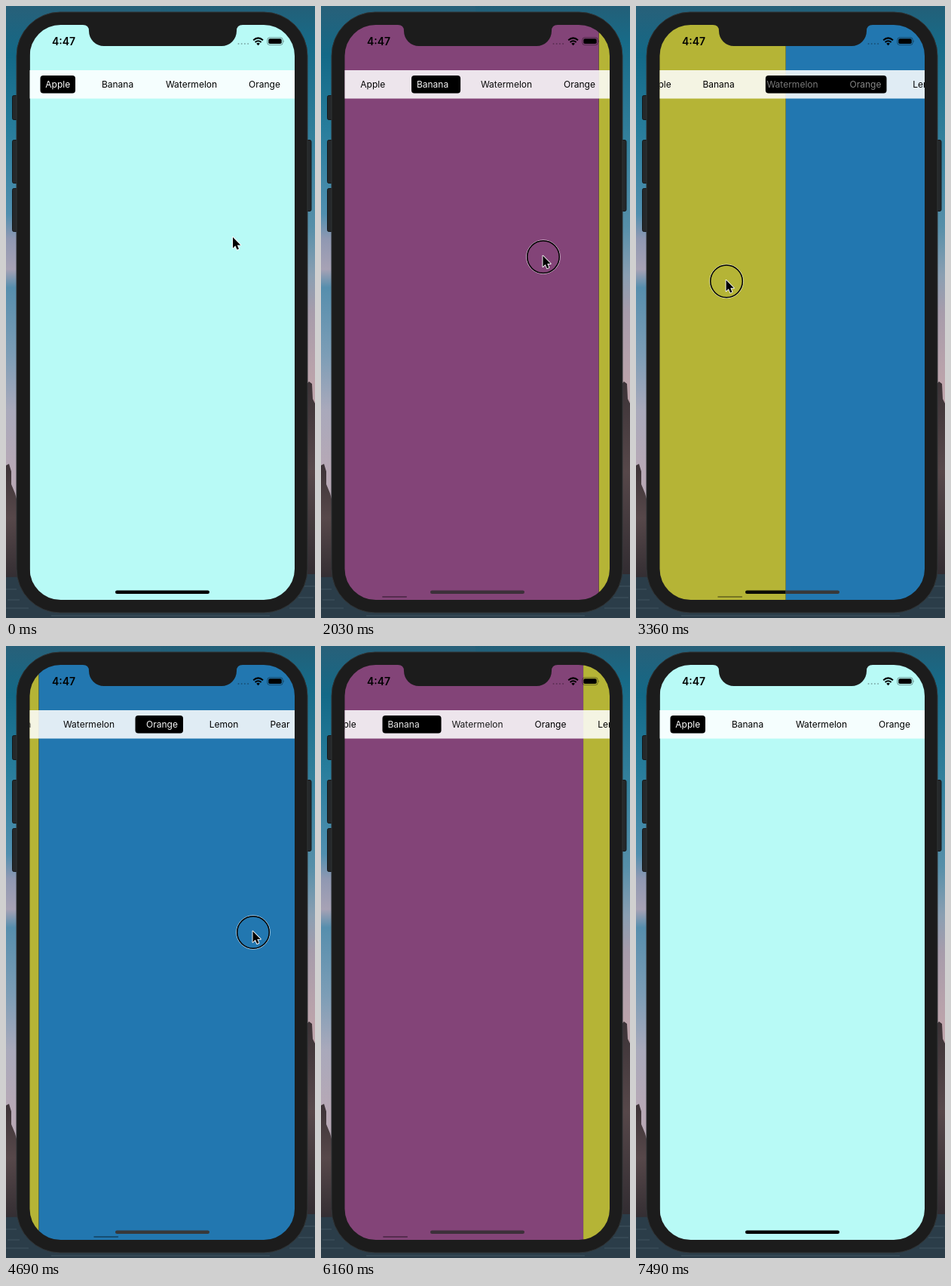
Write an HTML page that moves like this. It is 410 px wide and 810 px high and loops after 7.56 s.

```html
<!DOCTYPE html>
<html lang="en">
<head>
<meta charset="utf-8">
<title>Swipeable fruit tabs</title>
<style>
  html, body { margin: 0; width: 100%; height: 100%; overflow: hidden; background: #24566c; }
  #stage { display: block; width: 410px; height: 810px; }
  text { font-family: Inter, Roboto, sans-serif; }
  .clock { font-size: 14px; font-weight: 600; }
  .tab { font-size: 12px; text-anchor: middle; }
</style>
</head>
<body>
<svg id="stage" viewBox="0 0 410 810" xmlns="http://www.w3.org/2000/svg">
  <defs>
    <linearGradient id="skyLeft" x2="0" y2="1">
      <stop offset="0" stop-color="#286079"/>
      <stop offset=".08" stop-color="#136987"/>
      <stop offset=".2" stop-color="#277d9c"/>
      <stop offset=".34" stop-color="#508faf"/>
      <stop offset=".38" stop-color="#8f98b2"/>
      <stop offset=".43" stop-color="#a7a2b5"/>
      <stop offset=".46" stop-color="#568ead"/>
      <stop offset=".57" stop-color="#7c9db6"/>
      <stop offset=".66" stop-color="#a9a9bb"/>
      <stop offset=".76" stop-color="#b7a8b5"/>
    </linearGradient>
    <linearGradient id="skyRight" x2="0" y2="1">
      <stop offset="0" stop-color="#235f78"/>
      <stop offset=".06" stop-color="#176b88"/>
      <stop offset=".22" stop-color="#34809c"/>
      <stop offset=".36" stop-color="#568fa9"/>
      <stop offset=".44" stop-color="#8a9fb2"/>
      <stop offset=".5" stop-color="#a79cab"/>
      <stop offset=".62" stop-color="#bda4ab"/>
    </linearGradient>
    <linearGradient id="rock" x2="0" y2="1">
      <stop offset="0" stop-color="#3c3337"/>
      <stop offset=".45" stop-color="#57484a"/>
      <stop offset="1" stop-color="#302b30"/>
    </linearGradient>
    <clipPath id="screen"><rect x="31.5" y="25" width="351.5" height="761" rx="41"/></clipPath>
  </defs>

  <rect width="206" height="810" fill="url(#skyLeft)"/>
  <rect x="205" width="205" height="810" fill="url(#skyRight)"/>
  <path d="M0 608L4 606L7 616L7 633L12 645L15 656V765H0Z" fill="url(#rock)"/>
  <path d="M395 505L402 497L406 500L407 520L410 526V760H395Z" fill="url(#rock)"/>
  <path d="M0 756Q205 750 410 752V810H0Z" fill="#2b3d49"/>
  <path d="M0 772H14M2 786H18M0 797H30M392 768H410M388 783H408M376 797H410M60 807H350" stroke="#405460" fill="none"/>

  <g fill="#25282a" stroke="#14181a">
    <rect x="8.5" y="118.5" width="8" height="32" rx="2"/>
    <rect x="8.5" y="177.5" width="8" height="57" rx="2"/>
    <rect x="8.5" y="241.5" width="8" height="57" rx="2"/>
    <rect x="397" y="177.5" width="8" height="94" rx="2"/>
  </g>
  <rect x="14" y="8" width="386" height="795" rx="58" fill="#1c1c1c" stroke="#303436"/>

  <g clip-path="url(#screen)">
    <g id="pages"></g>
    <rect id="thumb" y="781" width="33" height="2" rx="1" fill="#000"/>
    <rect x="31" y="85" width="353" height="37.5" fill="#fff" opacity=".86"/>
    <g id="tabs"><rect id="mark" y="92" height="23.5" rx="4"/></g>
  </g>
  <path d="M102 24V25Q110 25 110 33A20 20 0 0 0 130 53H286A20 20 0 0 0 306 33Q306 25 314 25V24Z" fill="#1c1c1c"/>

  <text class="clock" x="61" y="51.5">4:47</text>
  <g opacity=".3">
    <circle cx="308.5" cy="50" r="1"/><circle cx="312.7" cy="50" r="1"/>
    <circle cx="316.9" cy="50" r="1"/><circle cx="321.1" cy="50" r="1"/>
  </g>
  <g fill="none" stroke="#000" stroke-width="2">
    <path d="M328.2 45.2Q334.6 39.6 341 45.2M330.6 48Q334.6 44.6 338.6 48"/>
  </g>
  <path d="M332.3 49.7Q334.6 47.9 336.9 49.7L334.6 52.2Z"/>
  <rect x="346.8" y="41.8" width="20.4" height="9.8" rx="3" fill="none" stroke="#000" opacity=".4"/>
  <rect x="348.3" y="43.3" width="17.4" height="6.8" rx="1.8"/>
  <path d="M368.4 45.2Q370 46.7 368.4 48.2Z" opacity=".45"/>

  <g id="pointer">
    <g id="touch" fill="none">
      <circle cx=".5" cy="1.5" r="22.3" stroke="#fff" stroke-width="1" opacity=".7"/>
      <circle cx=".5" cy="1.5" r="21.3" stroke="#000" stroke-width="1.5"/>
    </g>
    <path d="M0 0V14.4L3.3 11.3L5.6 16.6L8 15.6L5.8 10.4H10.3Z" stroke="#fff" stroke-width="1.8" paint-order="stroke" stroke-linejoin="round"/>
  </g>
</svg>

<script>
  const LOOP = 7560, STEP = 70, LEFT = 31.5, WIDTH = 351.5;
  const TAU = 130, SETTLE = 628, PAD = 7;

  const pageLooks = [
    ["#b8faf6", "#000"], ["#834478", "#3c303a"], ["#b5b436", "#0c0c06"], ["#2277b0", "#38383a"]
  ];
  // name, text start, text width
  const fruits = [
    ["Apple", 52.5, 32.5], ["Banana", 127, 42], ["Watermelon", 212, 68],
    ["Orange", 322, 42], ["Lemon", 406, 38], ["Pear", 486.5, 26]
  ];
  const barStops = [0, 0, 38.5, 136];
  const swipes = [
    { press: 670, release: 987, from: 0, dir: 1, pull: 0.5, x: 306, y: 322 },
    { press: 1940, release: 2254, from: 1, dir: 1, pull: 0.5, x: 309.5, y: 330 },
    { press: 3040, release: 3399, from: 2, dir: 1, pull: 0.66, x: 312, y: 355 },
    { press: 4600, release: 4962, from: 3, dir: -1, pull: 0.55, x: 315, y: 377 },
    { press: 5650, release: 5950, from: 2, dir: -1, pull: 0.5, x: 314, y: 380 },
    { press: 6520, release: 6800, from: 1, dir: -1, pull: 0.5, x: 314, y: 380 }
  ];

  const $ = id => document.getElementById(id);
  const clamp = v => Math.max(0, Math.min(1, v));
  const mix = (a, b, k) => a + (b - a) * k;
  const ease = k => k * k * (3 - 2 * k);
  const ramp = (t, a, b) => clamp((t - a) / (b - a));

  function make(tag, attrs, parent) {
    const el = document.createElementNS("http://www.w3.org/2000/svg", tag);
    set(el, attrs);
    return parent.appendChild(el);
  }
  function set(el, attrs) {
    for (const key in attrs) el.setAttribute(key, attrs[key]);
  }

  const pages = pageLooks.map(([color, home]) => {
    const box = make("svg", { y: 25, width: WIDTH, height: 761 }, $("pages"));
    make("rect", { width: WIDTH + 1, height: 761, fill: color }, box);
    const pill = make("rect", { y: 748.5, width: 125, height: 4.6, rx: 2.3, fill: home }, box);
    return { box, pill };
  });
  const labels = fruits.map(([name, x, w]) => {
    const el = make("text", { class: "tab", x: x + w / 2, y: 108.3 }, $("tabs"));
    el.textContent = name;
    return el;
  });

  const pullAt = (s, t) => s.pull * ramp(t, s.press, s.release) ** 2;

  function pageAt(t) {
    const s = swipes.findLast(s => t >= s.press);
    if (!s) return 0;
    const age = t - s.release;
    if (age < 0) return s.from + s.dir * pullAt(s, t);
    if (age >= SETTLE) return s.from + s.dir;
    return s.from + s.dir * (1 - (1 - s.pull) * Math.exp(-age / TAU));
  }

  // The bar recentres only once a page has come to rest.
  function barAt(t) {
    return swipes.reduce((x, s) => {
      const start = s.release + SETTLE;
      return mix(x, barStops[s.from + s.dir], ease(ramp(t, start, start + 280)));
    }, 0);
  }

  function pointerAt(t) {
    const i = swipes.findLastIndex(s => t >= s.press);
    const next = swipes[i + 1];
    if (i < 0) {
      const k = ease(ramp(t, 430, 640));
      return { x: mix(301, next.x, k), y: mix(306, next.y, k), down: false };
    }
    const s = swipes[i];
    const pull = pullAt(s, t);
    let x = s.x - s.dir * pull * 367;
    let y = s.y + 15 * pull;
    if (next && t > s.release) {
      const start = s.release + (s.dir > 0 ? 10 : 220);
      const k = ease(ramp(t, start, start + 260));
      x = mix(x, next.x, k);
      y = mix(y, next.y, k);
    }
    return { x, y, down: t < s.release };
  }

  function thumbAlpha(t) {
    const s = swipes.findLast(s => t >= s.press);
    return s ? 0.35 * (1 - ramp(t, s.release + 520, s.release + 660)) : 0;
  }

  function draw(t) {
    const p = pageAt(t), bar = barAt(t), pointer = pointerAt(t);

    pages.forEach(({ box, pill }, i) => {
      const x = LEFT + (i - p) * WIDTH;
      set(box, { x });
      set(pill, { x: 145 - x });
    });
    set($("thumb"), { x: 62 + 18.3 * p, opacity: thumbAlpha(t) });

    // The leading edge travels in the first half, the trailing edge in the second.
    const i = Math.floor(p), f = p - i;
    const [, ax, aw] = fruits[i], [, bx, bw] = fruits[i + 1];
    const left = mix(ax, bx, clamp(2 * f - 1)) - PAD;
    const right = mix(ax + aw, bx + bw, clamp(2 * f)) + PAD;
    set($("mark"), { x: left, width: right - left });
    set($("tabs"), { transform: `translate(${-bar} 0)` });
    labels.forEach((el, n) => {
      const v = Math.round(255 * clamp(1 - Math.abs(p - n)));
      set(el, { fill: `rgb(${v},${v},${v})` });
    });

    set($("pointer"), { transform: `translate(${pointer.x} ${pointer.y})` });
    set($("touch"), { visibility: pointer.down ? "visible" : "hidden" });
  }

  const begin = performance.now();
  function tick() {
    const t = (performance.now() - begin) % LOOP;
    draw(Math.floor(t / STEP) * STEP);
    requestAnimationFrame(tick);
  }
  draw(0);
  requestAnimationFrame(tick);
</script>
</body>
</html>
```
